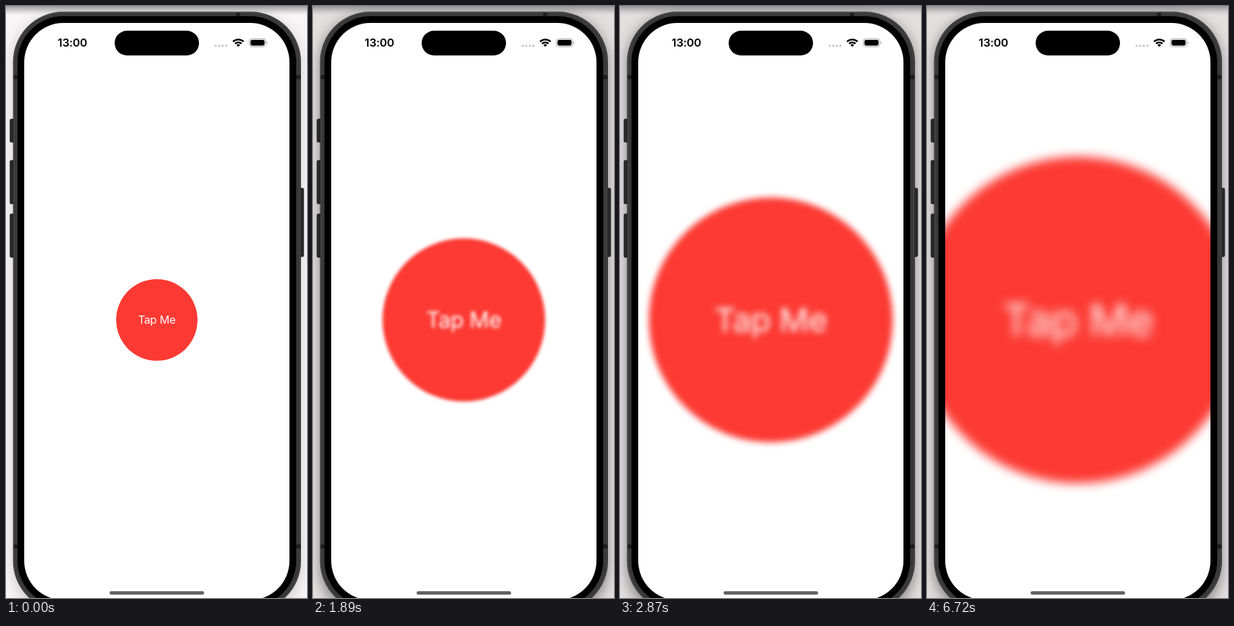
Recreate the animation shown at these times as an HTML page. Size 446 by 874 pixels, loop 7.14 s.

```html
<!DOCTYPE html>
<html lang="en">
<head>
<meta charset="utf-8">
<title>Tap Me</title>
<style>
  html, body { margin: 0; width: 100%; height: 100%; overflow: hidden; background: #fff; }
  svg { display: block; width: 446px; height: 874px; }
  text { font-family: Inter, Roboto, sans-serif; text-anchor: middle; }
  #shadow { filter: blur(9px); }
</style>
</head>
<body>
<svg viewBox="0 0 446 874">
  <defs>
    <linearGradient id="topShade" x2="0" y2="1">
      <stop offset="0" stop-color="#777" stop-opacity=".75"/>
      <stop offset="1" stop-color="#999" stop-opacity="0"/>
    </linearGradient>
    <clipPath id="screen"><rect x="27" y="25" width="393" height="852" rx="58"/></clipPath>
  </defs>

  <rect id="back" width="446" height="874"/>
  <rect id="shadow" x="10" y="12" width="427" height="890" rx="72" fill="#333"/>
  <rect width="446" height="13" fill="url(#topShade)"/>

  <!-- side buttons -->
  <g fill="#2a2a2a" stroke="#111" stroke-width=".8">
    <rect x="6" y="167" width="7" height="34" rx="1.5"/>
    <rect x="6" y="228" width="7" height="64" rx="1.5"/>
    <rect x="6" y="307" width="7" height="64" rx="1.5"/>
    <rect x="434" y="269" width="7" height="101" rx="1.5"/>
  </g>

  <!-- body -->
  <rect x="10.5" y="8.5" width="426.5" height="885" rx="74" fill="#161616"/>
  <rect x="11.7" y="9.7" width="424.1" height="883" rx="73" fill="#393939" stroke="#626262" stroke-width=".8"/>
  <g fill="#1c1c1c">
    <rect x="341" y="10" width="6" height="6"/>
    <rect x="11.5" y="102" width="6" height="6"/>
    <rect x="430" y="102" width="6" height="6"/>
    <rect x="11.5" y="795" width="6" height="6"/>
    <rect x="430" y="795" width="6" height="6"/>
  </g>
  <rect x="17" y="15" width="413" height="872" rx="68"/>
  <rect x="27" y="25" width="393" height="852" rx="58" fill="#fff"/>

  <!-- tap button -->
  <g clip-path="url(#screen)">
    <g id="blur">
      <g id="button">
        <circle r="60.3" fill="#fc3a33"/>
        <text id="label" y="5.9" font-size="16.2" letter-spacing="-.2" fill="#fff">Tap Me</text>
      </g>
    </g>
  </g>

  <!-- status bar -->
  <text x="98.5" y="60.4" font-size="16.6" font-weight="600" letter-spacing="-.2">13:00</text>
  <rect x="161" y="36.5" width="125" height="36.5" rx="18.25"/>
  <g fill="#c9c9c9">
    <circle cx="310.7" cy="58.7" r="1.8"/>
    <circle cx="316" cy="58.7" r="1.8"/>
    <circle cx="321.3" cy="58.7" r="1.8"/>
    <circle cx="326.6" cy="58.7" r="1.8"/>
  </g>
  <g transform="translate(344.2 60.3)" fill="none" stroke="#000" stroke-width="2.5">
    <path d="M-7.8-7.6A10.9 10.9 0 0 1 7.8-7.6"/>
    <path d="M-4.8-4.6A6.6 6.6 0 0 1 4.8-4.6"/>
    <path d="M0 0L-2.7-2.6A3.8 3.8 0 0 1 2.7-2.6Z" fill="#000" stroke="none"/>
  </g>
  <rect x="360.5" y="48.4" width="24.4" height="11.8" rx="3.8" fill="none" stroke="#a5a5a5"/>
  <rect x="362.2" y="50.1" width="21" height="8.4" rx="2.4"/>
  <path d="M386.2 52.3q2.6 2 0 4z" fill="#a5a5a5"/>

  <rect x="153.5" y="864" width="140" height="5" rx="2.5" fill="#626262"/>
</svg>
<script>
const LOOP = 7140, STEP = 70, OMEGA = 2 * Math.PI / 0.55;
const taps = [{ down: 1050, up: 1140 }, { down: 2170, up: 2190 }, { down: 5880, up: 5970 }];
const $ = id => document.getElementById(id);

// Critically damped spring from 0 to 1, time in ms
function spring(ms) {
  const x = OMEGA * Math.max(0, ms) / 1000;
  return 1 - (1 + x) * Math.exp(-x);
}

function draw(now) {
  const t = Math.floor(now % LOOP / STEP) * STEP;
  let scale = 1, opacity = 1;
  for (const { down, up } of taps) {
    if (t < down) break;
    const p = spring(t - up);
    scale += p;
    opacity = 0.2 + 0.8 * p;
  }
  const idle = t < taps[0].down;
  $('back').setAttribute('fill', idle ? '#f7f5f5' : '#e2dfdf');
  $('shadow').setAttribute('opacity', idle ? 0.2 : 0.5);
  $('button').setAttribute('transform', `translate(223.5 463.5) scale(${scale})`);
  $('label').setAttribute('opacity', opacity);
  $('blur').style.filter = scale > 1 ? `blur(${(scale - 1) * 2.4}px)` : 'none';
}

const start = performance.now();
function tick() {
  draw(performance.now() - start);
  requestAnimationFrame(tick);
}
tick();
</script>
</body>
</html>
```
